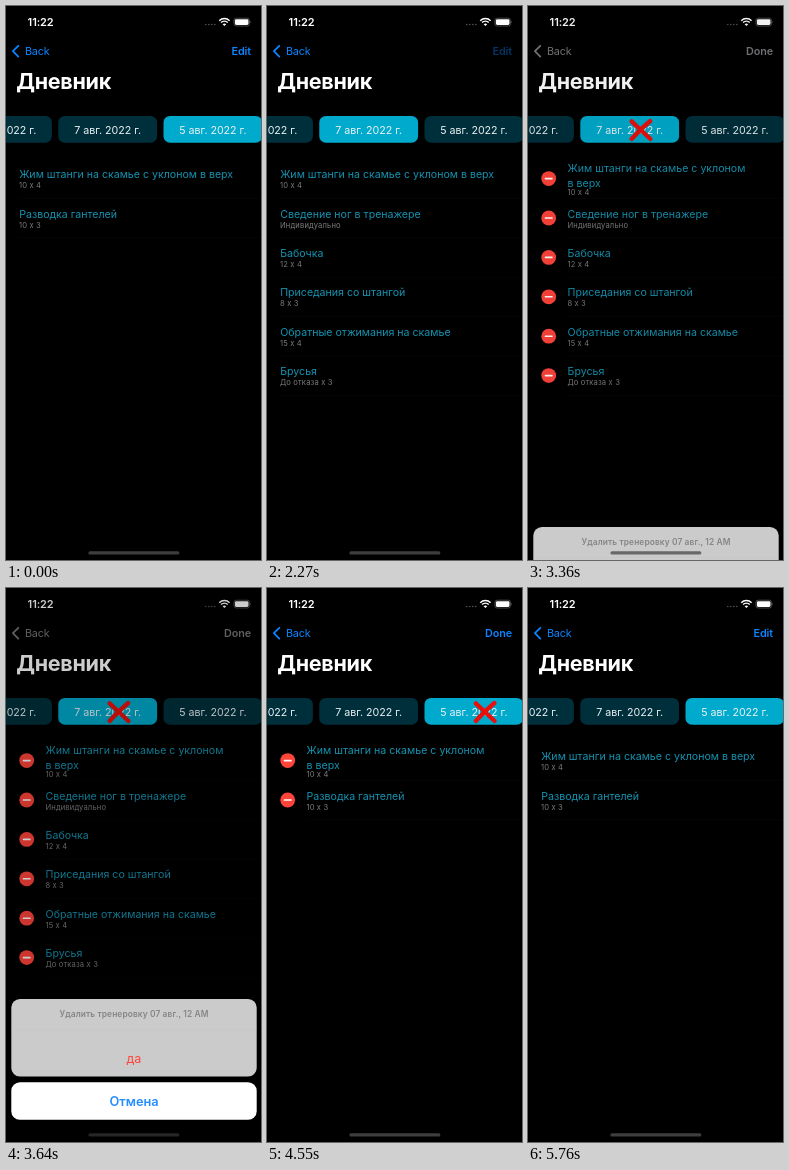
Animation of 255 by 554 pixels, one loop 5.89 s. Source, as an HTML page:

```html
<!DOCTYPE html>
<html lang="ru">
<head>
<meta charset="utf-8">
<title>Дневник</title>
<style>
html, body { margin: 0; width: 100%; height: 100%; overflow: hidden; background: #000; }
svg { display: block; width: 100vw; height: 100vh; font-family: Inter, sans-serif; }
</style>
</head>
<body>
<svg id="stage" viewBox="0 0 255 554" preserveAspectRatio="none"></svg>
<script>
const LOOP = 5890;
const BLUE = '#0a84ff', TEAL = '#1492af', RED = '#ff443a';
const stage = document.getElementById('stage');

function add(parent, tag, attrs, text) {
  const el = document.createElementNS('http://www.w3.org/2000/svg', tag);
  set(el, attrs);
  if (text) el.textContent = text;
  parent.appendChild(el);
  return el;
}
function set(el, attrs) {
  for (const k in attrs) el.setAttribute(k, attrs[k]);
}
function label(parent, text, x, y, size, fill, extra) {
  return add(parent, 'text', { x, y, 'font-size': size, fill, ...extra }, text);
}
const group = (parent, attrs = {}) => add(parent, 'g', attrs);
const move = (el, x, y) => el.setAttribute('transform', `translate(${x} ${y})`);
const fade = (el, v) => el.setAttribute('opacity', v);
const mix = (a, b, k) => `rgb(${a.map((v, i) => Math.round(v + (b[i] - v) * k))})`;

// Value of the last [time, value] pair that has started.
function held(t, pairs) {
  let v = pairs[0][1];
  for (const [at, next] of pairs) if (t >= at) v = next;
  return v;
}

// Navigation bar
const page = group(stage);
const chevron = add(page, 'path', {
  d: 'M12.3 39.8 L6.9 45.2 L12.3 50.6', fill: 'none', 'stroke-width': 1.8,
  'stroke-linecap': 'round', 'stroke-linejoin': 'round'
});
const back = label(page, 'Back', 19, 49.3, 10.8, BLUE, { 'letter-spacing': -0.2 });
const bold = { 'font-weight': 600, 'text-anchor': 'end', 'letter-spacing': -0.1 };
const edit = label(page, 'Edit', 245, 49.3, 10.8, BLUE, bold);
const done = label(page, 'Done', 245, 49.3, 10.8, BLUE, bold);
label(page, 'Дневник', 10.2, 83.3, 21.6, '#fff', { 'font-weight': 700, 'letter-spacing': -0.3 });

// Date chips
function chip(x, text) {
  const g = group(page);
  const box = add(g, 'rect', { x, y: 109.9, width: 98.8, height: 26.9, rx: 6.6 });
  label(g, text, x + 49.4, 127.5, 10.7, '#e9f1f3', { 'text-anchor': 'middle', 'letter-spacing': -0.05 });
  return box;
}
const chips = [chip(-52.9, '9 авг. 2022 г.'), chip(52.3, '7 авг. 2022 г.'), chip(157.5, '5 авг. 2022 г.')];
const cross = group(page);
add(cross, 'path', {
  d: 'M-9.4 -8.6 L9.4 9 M9.2 -9 Q0 -1.6 -9.4 9', stroke: '#e8100c', 'stroke-width': 4.3,
  fill: 'none', 'stroke-linecap': 'round'
});

// Exercise lists
const LONG = ['Жим штанги на скамье с уклоном', 'в верх'];
function list(items) {
  const root = group(page);
  const rows = items.map(([name, note], i) => {
    const y = i * 39.4;
    const row = group(root);
    const badge = group(row);
    add(badge, 'circle', { cx: 20.7, cy: 172.6 + y, r: 7.4, fill: RED });
    add(badge, 'rect', { x: 16.7, y: 171.8 + y, width: 8, height: 1.6, rx: 0.6, fill: '#fff' });
    const body = group(row);
    const one = label(body, name, 13.2, 172.1 + y, 10.62, TEAL);
    const two = group(body);
    if (!i) LONG.forEach((s, n) => label(two, s, 13.2, 166.2 + n * 14.4, 10.62, TEAL));
    const sub = label(body, note, 13, 182.1 + y, 7.6, '#7c7c7c', { 'letter-spacing': 0.15 });
    const line = add(row, 'rect', { x: 13, y: 192 + y, width: 242, height: 0.6, fill: '#080808' });
    return { badge, body, one, two, sub, line };
  });
  return { root, rows };
}
const press = ['Жим штанги на скамье с уклоном в верх', '10 x 4'];
const shortList = list([press, ['Разводка гантелей', '10 x 3']]);
const longList = list([
  press,
  ['Сведение ног в тренажере', 'Индивидуально'],
  ['Бабочка', '12 x 4'],
  ['Приседания со штангой', '8 x 3'],
  ['Обратные отжимания на скамье', '15 x 4'],
  ['Брусья', 'До отказа x 3']
]);

// Status bar
label(stage, '11:22', 21.6, 20, 11, '#fff', { 'font-weight': 600, 'letter-spacing': -0.1 });
for (let i = 0; i < 4; i++) add(stage, 'circle', { cx: 199.8 + i * 3, cy: 18.4, r: 0.75, fill: '#5c5c5c' });
const wifi = group(stage, { fill: 'none', stroke: '#fff', 'stroke-width': 1.5 });
for (const r of [7.4, 4.8]) {
  const d = r * 0.7;
  add(wifi, 'path', { d: `M${218.4 - d} ${19.9 - d} A${r} ${r} 0 0 1 ${218.4 + d} ${19.9 - d}` });
}
add(stage, 'path', { d: 'M216.6 18.2 Q218.4 16.8 220.2 18.2 L218.4 20.1 Z', fill: '#fff' });
add(stage, 'rect', { x: 227.9, y: 12.2, width: 15.6, height: 7.8, rx: 2.3, fill: 'none', stroke: '#777', 'stroke-width': 0.6 });
add(stage, 'rect', { x: 228.9, y: 13.2, width: 13.6, height: 5.8, rx: 1.4, fill: '#fff' });
add(stage, 'path', { d: 'M244.3 14.8 q1.2 1.3 0 2.6 z', fill: '#888' });

// Action sheet
const shade = add(stage, 'rect', { width: 255, height: 554, fill: '#000' });
const sheet = group(stage);
const mid = { 'text-anchor': 'middle' };
add(sheet, 'rect', { x: 5.3, y: 411, width: 245.4, height: 77.6, rx: 8.6, fill: '#cbcbcb' });
add(sheet, 'rect', { x: 5.3, y: 440.8, width: 245.4, height: 0.5, fill: '#c1c1c1' });
label(sheet, 'Удалить тренеровку 07 авг., 12 AM', 128, 429, 8.4, '#858585', { ...mid, 'font-weight': 600, 'letter-spacing': 0.1 });
label(sheet, 'да', 128, 475.3, 12.6, '#ff453c', mid);
add(sheet, 'rect', { x: 5.3, y: 494.2, width: 245.4, height: 37.6, rx: 8.6, fill: '#fff' });
label(sheet, 'Отмена', 128, 517.7, 12.8, '#258dff', { ...mid, 'font-weight': 600 });
const home = add(stage, 'rect', { x: 82.4, y: 545.3, width: 91, height: 3.2, rx: 1.6 });

function showList(l, visible, k) {
  l.root.style.display = visible ? '' : 'none';
  l.rows.forEach((r, i) => {
    move(r.badge, -28 * (1 - k), 0);
    fade(r.badge, k);
    move(r.body, 26.4 * k, 0);
    move(r.line, 26.4 * k, 0);
    if (i) return;
    fade(r.one, 1 - k);
    fade(r.two, k);
    move(r.sub, 0, 7 * k);
  });
}

const DARK = [0, 47, 60], LIT = [0, 170, 204];

function draw(t) {
  const editing = held(t, [[0, 0], [2450, .3], [2545, .8], [2640, 1], [5550, .6], [5650, .15], [5760, 0]]);
  const drop = held(t, [[0, 150], [3360, 110], [3450, 38], [3550, 8], [3640, 0], [4180, 18], [4270, 85], [4360, 135], [4450, 150]]);
  const dim = held(t, [[0, 0], [3360, .06], [3450, .14], [3550, .18], [3640, .2], [4180, .18], [4270, .09], [4360, .02], [4450, 0]]);
  const seven = held(t, [[0, 0], [1450, 1], [4450, .5], [4550, 0]]);
  const five = held(t, [[0, 1], [1450, .9], [1910, 0], [4450, .5], [4550, 1]]);
  const onSeven = t >= 1450 && t < 4450;
  const inEdit = t >= 2450 && t < 5550;
  const tint = t >= 3360 && t < 4180 ? '#77777b' : BLUE;

  set(chevron, { stroke: tint });
  set(back, { fill: tint });
  set(done, { fill: tint });
  fade(done, inEdit ? 1 : 0);
  fade(edit, inEdit ? 0 : t >= 2270 && t < 2450 ? .4 : 1);
  [0, seven, five].forEach((k, i) => set(chips[i], { fill: mix(DARK, LIT, k) }));
  move(cross, onSeven ? 113 : 218.2, 124);
  fade(cross, editing);
  showList(longList, onSeven, editing);
  showList(shortList, !onSeven, editing);
  fade(shade, dim);
  move(sheet, 0, drop);
  set(home, { fill: drop > 140 ? '#3e3e3e' : drop > 40 ? '#686868' : '#262626' });
}

const start = performance.now();
function tick() {
  draw((performance.now() - start) % LOOP);
  requestAnimationFrame(tick);
}
draw(0);
tick();
</script>
</body>
</html>
```
